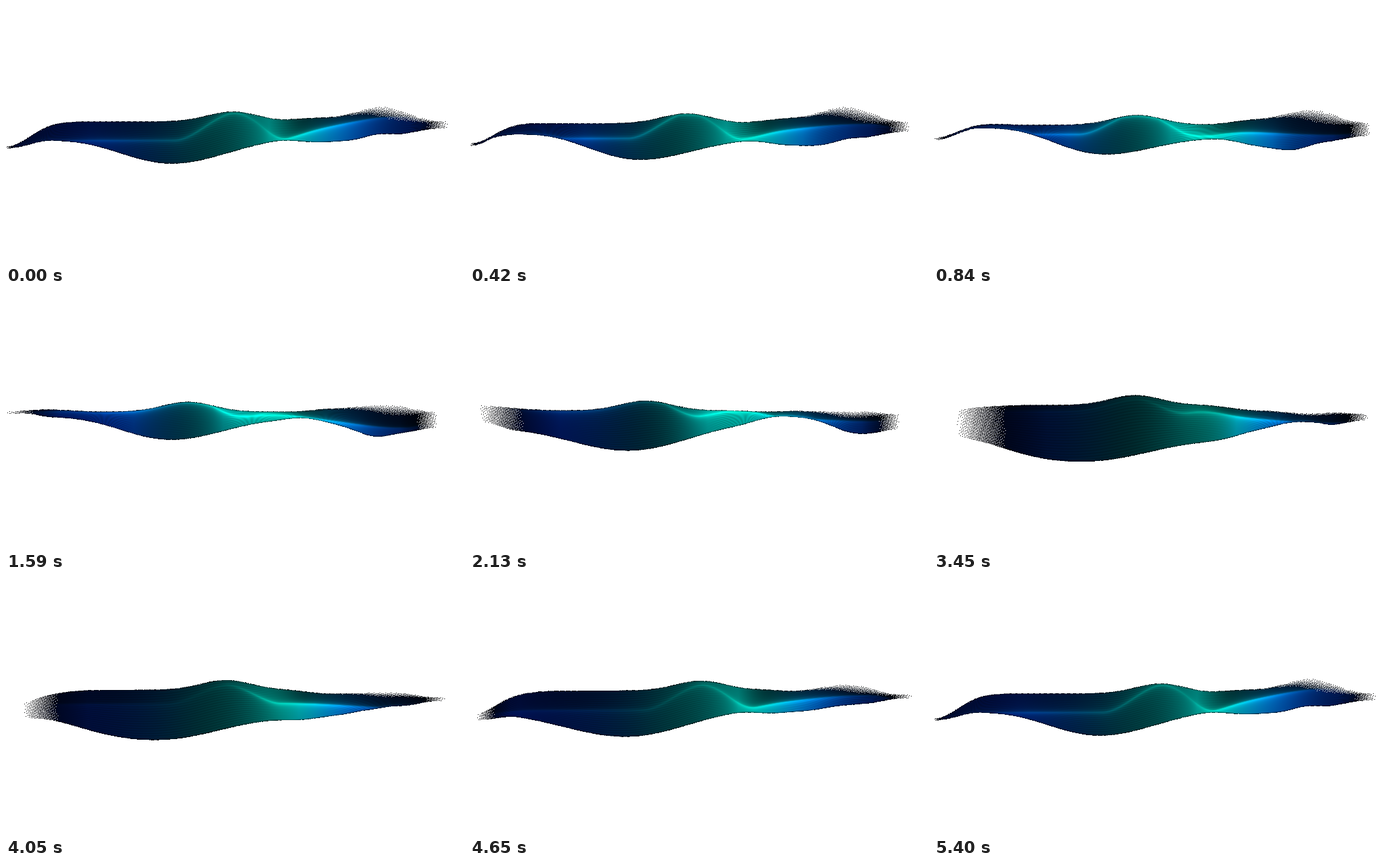
Recreate the animation shown at these times as an HTML page with a canvas. Size 700 by 394 pixels, loop 5430 ms.

```html
<!DOCTYPE html>
<html lang="en">
<head>
<meta charset="utf-8">
<title>Particle wave</title>
<style>
  html, body { margin: 0; width: 100%; height: 100%; overflow: hidden; background: #fff; }
  canvas { display: block; width: 100%; height: 100%; }
</style>
</head>
<body>
<canvas id="stage" width="700" height="394"></canvas>
<script>
const W = 700, Y0 = 140, H = 130;
const LOOP = 5430, STEP = 30, CYCLE = 5400;
const ctx = document.getElementById('stage').getContext('2d');
const image = ctx.createImageData(W, H);
let phase = 0;

const clamp = (v, lo = 0, hi = 1) => Math.min(hi, Math.max(lo, v));
const mix = (a, b, u) => a + (b - a) * u;
const bump = (x, centre, width) => Math.exp(-(((x - centre) / width) ** 2));
const ease = (a, b, x) => {
  const u = clamp((x - a) / (b - a));
  return u * u * (3 - 2 * u);
};
// Periodic swing that peaks at the given angle in degrees.
const swing = (lag, harmonic = 1) => Math.cos(harmonic * phase - lag * Math.PI / 180);

const crestX = () => 311 + 43 * swing(-35);

function topEdge(x) {
  return 176
    + 6 * ease(20, 150, x) * swing(95 + 85 * ease(400, 500, x))
    + (16 + 22 * swing(-11)) * bump(x, 0, 50)
    - 15 * bump(x, crestX(), 55)
    + (12 * swing(198) - 5) * bump(x, 573, 48)
    + 6 * ease(600, 660, x);
}

function bottomEdge(x) {
  const amount = 12.5 + 14 * bump(x, 140, 85) - 6 * bump(x, 500, 50);
  const lag = 286 - 54 * ease(0, 70, x) + 265 * ease(400, 620, x);
  const ripple = 8 * (1 - ease(550, 610, x));
  return 204 + 38 * bump(x, 245, 125) - 8 * ease(600, 660, x)
    + amount * swing(lag)
    + ripple * swing(160 * (x / 550) ** 3, 2);
}

// Bright fold: hangs low on the left, climbs to the crest, then falls to the right sheet.
function fold(x) {
  const crest = crestX();
  const left = 163 + (26 + 16 * swing(-10)) * (1 - ease(crest - 90, crest + 5, x))
    + (5 + 6 * swing(-5)) * bump(x, 0, 50);
  const reach = 12 * ease(430, 600, x) * (1 - .5 * ease(610, 660, x));
  const right = 191 + 13 * swing(0) * bump(x, 410, 45)
    + reach * (swing(156) + swing(164, 2));
  return mix(left, right, ease(crest, crest + 85, x));
}

function foldShine(x, depth) {
  const left = (.5 + .38 * swing(75)) * ease(-40, 200, x);
  const right = .65 * (1 - .75 * ease(500, 620, x));
  const gap = 1 - .75 * Math.max(0, swing(0)) * bump(x, crestX() + 45, 35);
  return mix(left, right, ease(300, 420, x)) * gap * clamp(40 / depth, .35, 1);
}

const greenAt = x => 10 + 135 * bump(x, 425, x < 425 ? 190 : 120);
const blueAt = x => 40 + 100 * bump(x, 330, 260) + 60 * bump(x, 510, 70) - 30 * bump(x, 290, 70);

const fract = v => v - Math.floor(v);
const grain = (x, y) => fract(52.9829 * fract(.06711 * x + .00584 * y));

function draw(t) {
  phase = t / CYCLE * 2 * Math.PI;
  const left = Math.max(0, 10 + 26 * swing(220)), leftFade = 45 + 38 * swing(195);
  const right = 666 + 10 * swing(-30), rightFade = 32;
  const fray = 11 + 8 * swing(40);
  const px = image.data;
  px.fill(0);

  for (let x = 0; x < W; x++) {
    const side = Math.min((x - left + 1) / leftFade, (right - x) / rightFade);
    if (side <= 0) continue;
    const a = topEdge(x), b = Math.max(bottomEdge(x), a + 4);
    const r = clamp(fold(x), a + 2, b - 1);
    const depth = b - a;
    const shine = foldShine(x, depth);
    const front = ease(380, 460, x);
    const body = clamp(36 / mix(depth, Math.max(b - r, 12), front * .5), .3, 1);
    const back = mix(.65, 1, ease(150, 320, x)) * (1 - .7 * front);
    const frayed = 2 + fray * bump(x, 590, 45);
    const green = greenAt(x), blue = blueAt(x);
    const sideLight = clamp(side / 1.8);

    for (let y = Math.max(Y0, Math.ceil(a)); y <= Math.min(b, Y0 + H - 1); y++) {
      const cover = Math.min(side, (y - a + 1) / frayed, (b - y + 1) / 1.5);
      if (cover < grain(x, y)) continue;
      const d = Math.abs(y - r);
      const below = clamp((y - r) / 3 + .5);
      const mesh = 1 + .1 * Math.sin((y - a) / depth * 130 + x * .05);
      const halo = shine * (.7 * Math.exp(-d / 2.5) + .35 * Math.exp(-d / 13));
      const edge = clamp(Math.min(y - a + 1, b - y + 1) / 3, .1, 1);
      const dim = edge * sideLight * clamp(cover);
      const light = body * mesh * mix(back, 1, below) + halo;
      const o = ((y - Y0) * W + x) * 4;
      px[o + 1] = (green * light + 60 * halo) * dim;
      px[o + 2] = (blue * light + 30 * halo) * dim;
      px[o + 3] = 255;
    }
  }
  ctx.putImageData(image, 0, Y0);
}

const start = performance.now();
let shown = -1;
function tick() {
  const elapsed = (performance.now() - start) % LOOP;
  const t = Math.floor(elapsed / STEP) * STEP % CYCLE;
  if (t !== shown) draw(shown = t);
  requestAnimationFrame(tick);
}
tick();
</script>
</body>
</html>
```
